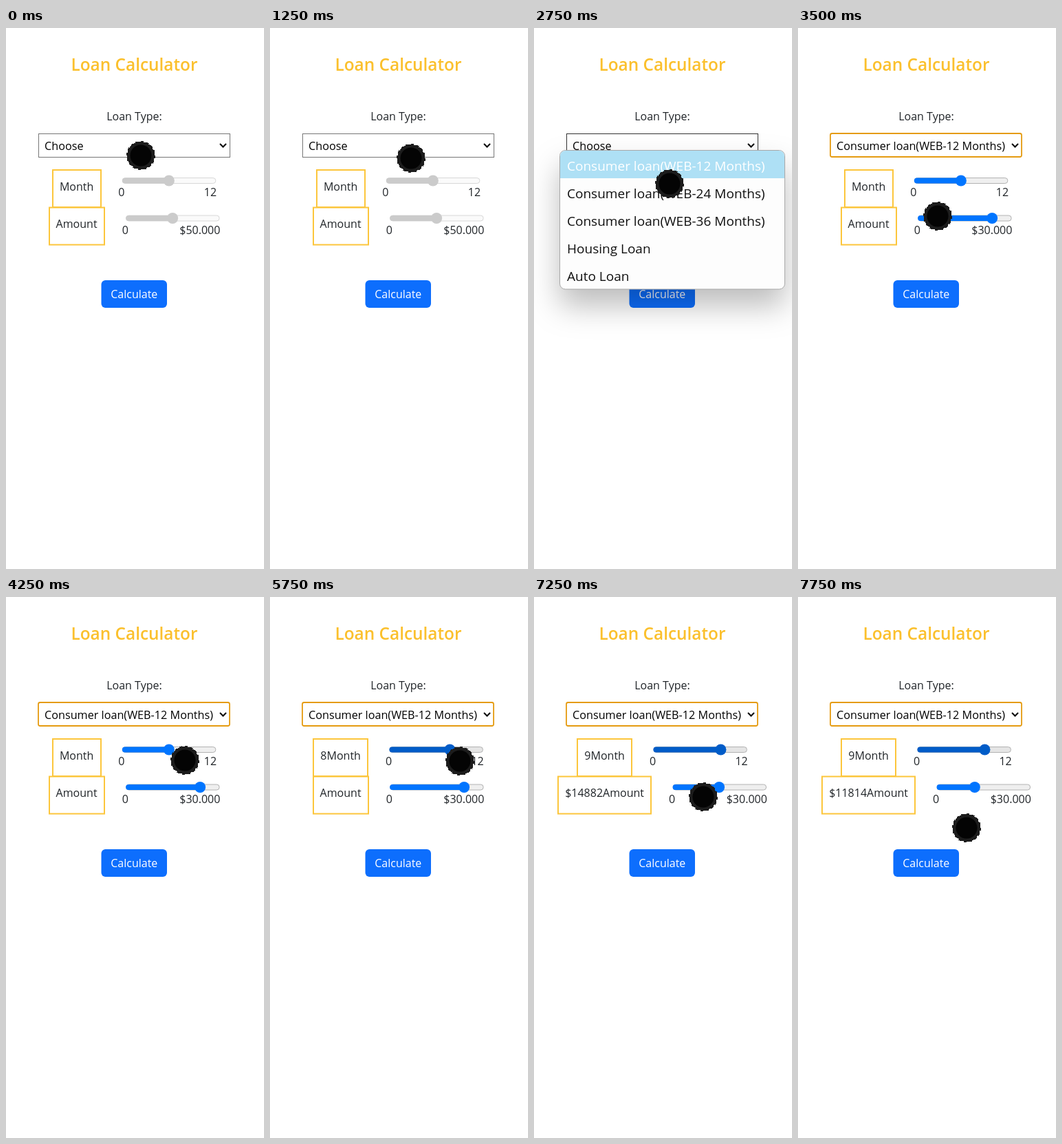
Write an HTML page that moves like this. It is 375 px wide and 785 px high and loops after 8000 ms.

```html
<!DOCTYPE html>
<html lang="en">
<head>
<meta charset="utf-8">
<title>Loan Calculator</title>
<style>
html, body { margin: 0; width: 100%; height: 100%; overflow: hidden; background: #fff; }
svg { display: block; width: 100%; height: 100%; font: 16px "Open Sans", "Noto Sans", sans-serif; fill: #212529; }
.title { font-size: 24.4px; font-weight: 600; fill: #fbc02d; }
.mid { text-anchor: middle; }
.end { text-anchor: end; }
.button { fill: #0d6efd; }
.light { fill: #fff; }
.box { fill: none; stroke: #fcc63c; stroke-width: 2; }
.choice { font-size: 16.2px; fill: #000; }
.field { x: 47.5px; y: 153.5px; width: 278px; height: 34px; fill: #fff; stroke: #767676; }
.field.dark { stroke: #333; }
.field.focus { x: 47px; y: 153px; rx: 2.5px; stroke: #e59b10; stroke-width: 1.8; }
.arrow { fill: none; stroke: #000; stroke-width: 2; }
.track { fill: #efefef; stroke: #b2b2b2; }
.value { fill: #0075ff; }
.off .track { fill: #fafafa; stroke: #d8d8d8; }
.off .value { fill: #cbcbcb; }
.pressed .track { fill: #e5e5e5; }
.pressed .value { fill: #005cc8; }
.menu { font-size: 19px; fill: #101010; }
.sheet { fill: #fdfdfd; stroke: #a8a8a8; filter: drop-shadow(0 24px 22px rgba(0, 0, 0, .26)); }
.hot { fill: #aee0f5; }
.ring { fill: #1c1c1c; stroke: #1c1c1c; stroke-width: 2; stroke-dasharray: 1; shape-rendering: crispEdges; }
.dot { fill: #040404; }
</style>
</head>
<body>
<svg viewBox="0 0 375 785" preserveAspectRatio="none">
  <text class="title mid" x="186.5" y="62">Loan Calculator</text>
  <text class="mid" x="186.5" y="134">Loan Type:</text>
  <rect id="field"/>
  <text id="choice" class="choice" x="56" y="177"></text>
  <path class="arrow" d="M311 168l4.5 4.5 4.5-4.5"/>
  <g id="month"></g>
  <g id="amount"></g>
  <rect class="button" x="138.5" y="366" width="95.5" height="40" rx="6"/>
  <text class="light mid" x="186.3" y="392">Calculate</text>
  <g id="menu" class="menu">
    <rect class="sheet" x="37.5" y="177.5" width="327" height="201.5" rx="8"/>
    <path id="hot" class="hot" d="M38 218v-32a8 8 0 0 1 8-8h310a8 8 0 0 1 8 8v32z"/>
  </g>
  <g id="cursor">
    <circle class="ring" r="20" pathLength="32"/>
    <circle class="dot" r="15.5"/>
  </g>
</svg>
<script>
const LOOP = 8000;
const $ = id => document.getElementById(id);
const set = (el, attrs) => { for (const k in attrs) el.setAttribute(k, attrs[k]); };
const add = (parent, tag, attrs, text = '') => {
  const el = document.createElementNS('http://www.w3.org/2000/svg', tag);
  set(el, attrs);
  el.textContent = text;
  return parent.appendChild(el);
};

const loans = ['Consumer loan(WEB-12 Months)', 'Consumer loan(WEB-24 Months)',
  'Consumer loan(WEB-36 Months)', 'Housing Loan', 'Auto Loan'];
const options = loans.map((name, i) => add($('menu'), 'text', { x: 48, y: 207 + 40 * i }, name));

// Each step changes part of the state and holds until the next one.
const steps = [
  [0, { at: [196, 185], choice: 'Choose', field: '', open: false, hot: false, slider: 'off',
        months: 6, monthText: 'Month', monthState: 'off',
        amount: 25000, max: 50000, amountText: 'Amount' }],
  [250, { at: [187, 165] }],
  [500, { at: [165, 109] }],
  [1000, { at: [197, 183] }],
  [1250, { at: [205, 189] }],
  [1750, { open: true }],
  [2000, { field: 'dark' }],
  [2500, { at: [197, 226] }],
  [2750, { hot: true }],
  [3000, { open: false, field: 'focus', choice: loans[0], slider: '', monthState: '', max: 30000 }],
  [3250, { at: [184, 281] }],
  [3500, { at: [203, 273] }],
  [3750, { at: [233, 235] }],
  [4000, { at: [252, 241] }],
  [4250, { at: [260, 237] }],
  [4500, { at: [250, 235], monthState: 'pressed', months: 7, monthText: '7Month' }],
  [4750, { at: [242, 235], months: 6, monthText: '6Month' }],
  [5750, { at: [276, 238], months: 8, monthText: '8Month' }],
  [6000, { at: [290, 239], months: 9, monthText: '9Month' }],
  [6500, { at: [261, 292] }],
  [6750, { at: [258, 296] }],
  [7000, { at: [247, 288] }],
  [7250, { at: [246, 290], amount: 14882, amountText: '$14882Amount' }],
  [7500, { at: [245, 294], amount: 11814, amountText: '$11814Amount' }],
  [7750, { at: [245, 335] }]
];

function makeRow(id, top) {
  const g = $(id), y = top + 16;
  const box = add(g, 'rect', { class: 'box', y: top + .5, height: 54 });
  const label = add(g, 'text', { class: 'mid', x: 102.6, y: top + 30 });
  const track = add(g, 'rect', { class: 'track', y: y - 4, width: 135.5, height: 8, rx: 4 });
  const fill = add(g, 'rect', { class: 'value', y: y - 4, height: 8, rx: 4 });
  const thumb = add(g, 'circle', { class: 'value', cy: y, r: 8 });
  const low = add(g, 'text', { y: top + 38.5 }, '0');
  const high = add(g, 'text', { class: 'end', y: top + 38.5 });
  return (text, part, max, state) => {
    label.textContent = text;
    high.textContent = max;
    const width = label.getComputedTextLength() + 22.3;
    const left = 133 + width / 2;
    const x = left + 8 + 120 * part;
    set(g, { class: state });
    set(box, { x: Math.round(102.9 - width / 2) + 1, width: Math.round(width) - 2 });
    set(track, { x: left + .5 });
    set(fill, { x: left, width: x - left });
    set(thumb, { cx: x });
    set(low, { x: left - 5.5 });
    set(high, { x: left + 137.3 });
  };
}
const drawMonth = makeRow('month', 205.5);
const drawAmount = makeRow('amount', 260);

function draw(t) {
  const s = Object.assign({}, ...steps.filter(step => step[0] <= t).map(step => step[1]));
  set($('field'), { class: 'field ' + s.field });
  $('choice').textContent = s.choice;
  drawMonth(s.monthText, s.months / 12, '12', s.monthState);
  drawAmount(s.amountText, s.amount / s.max, `$${s.max / 1000}.000`, s.slider);
  set($('menu'), { visibility: s.open ? 'visible' : 'hidden' });
  set($('hot'), { visibility: s.open && s.hot ? 'visible' : 'hidden' });
  options[0].setAttribute('class', s.hot ? 'light' : '');
  set($('cursor'), { transform: `translate(${s.at})` });
}

const start = performance.now();
function tick() {
  draw((performance.now() - start) % LOOP);
  requestAnimationFrame(tick);
}
tick();
</script>
</body>
</html>
```
